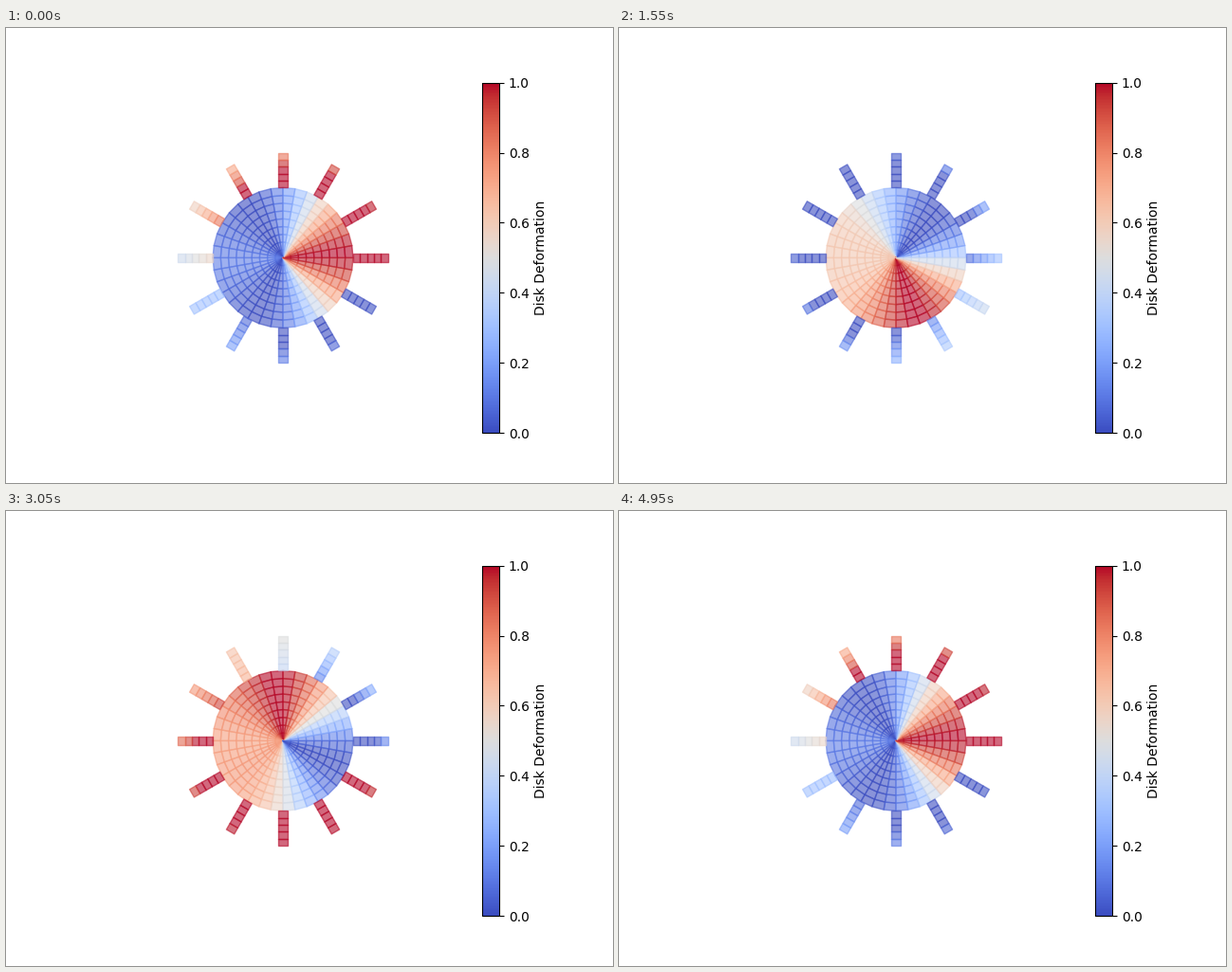
A matplotlib script for the animation above (5000 ms loop, 640 by 480 pixels).

```python
import numpy as np
import matplotlib.pyplot as plt
from matplotlib.animation import FuncAnimation
from matplotlib.cm import ScalarMappable
from matplotlib.collections import PolyCollection
from matplotlib.colors import Normalize

FRAMES = 100
SECTORS, RINGS = 36, 9
BLADES, CELLS = 12, 5
BLADE_LENGTH, BLADE_WIDTH = 0.5, 0.13

theta = np.arange(SECTORS) * 2 * np.pi / SECTORS
phases = np.linspace(0, 2 * np.pi, FRAMES)
blade_gain = np.linspace(2, 1, CELLS)


def disk_quads():
    r = np.linspace(0, 1, RINGS + 1)
    step = 2 * np.pi / SECTORS
    quads = []
    for r0, r1 in zip(r[:-1], r[1:]):
        for a in theta:
            b = a + step
            quads.append([(r0 * np.cos(a), r0 * np.sin(a)),
                          (r1 * np.cos(a), r1 * np.sin(a)),
                          (r1 * np.cos(b), r1 * np.sin(b)),
                          (r0 * np.cos(b), r0 * np.sin(b))])
    return quads


def blade_quads():
    r = np.linspace(1, 1 + BLADE_LENGTH, CELLS + 1)
    h = BLADE_WIDTH / 2
    quads = []
    for k in range(BLADES):
        a = 2 * np.pi * k / BLADES
        c, s = np.cos(a), np.sin(a)
        for r0, r1 in zip(r[:-1], r[1:]):
            corners = [(r0, -h), (r1, -h), (r1, h), (r0, h)]
            quads.append([(x * c - y * s, x * s + y * c) for x, y in corners])
    return quads


def deformation(phase):
    """Normalised values of all disk cells, then all blade cells."""
    wave = np.cos(theta + phase) + 0.5 * np.cos(2 * theta + phase)
    low, high = wave.min(), wave.max()
    blades = np.outer(wave[:BLADES], blade_gain).ravel()
    values = np.concatenate([np.tile(wave, RINGS), blades])
    return np.clip((values - low) / (high - low), 0, 1)


fig, ax = plt.subplots(figsize=(6.4, 4.8), dpi=100)
ax.set_xlim(-2.5, 2.5)
ax.set_ylim(-2.5, 2.5)
ax.set_aspect("equal")
ax.axis("off")

norm = Normalize(0, 1)
mesh = PolyCollection(disk_quads() + blade_quads(), cmap="coolwarm", norm=norm,
                      edgecolors="face", linewidths=1, alpha=0.6)
mesh.set_array(deformation(0))
ax.add_collection(mesh, autolim=False)

fig.colorbar(ScalarMappable(norm, "coolwarm"), ax=ax, label="Disk Deformation")


def update(frame):
    mesh.set_array(deformation(phases[frame]))
    return [mesh]


anim = FuncAnimation(fig, update, frames=FRAMES, interval=50,
                     repeat=True, repeat_delay=0)
plt.show()
```
